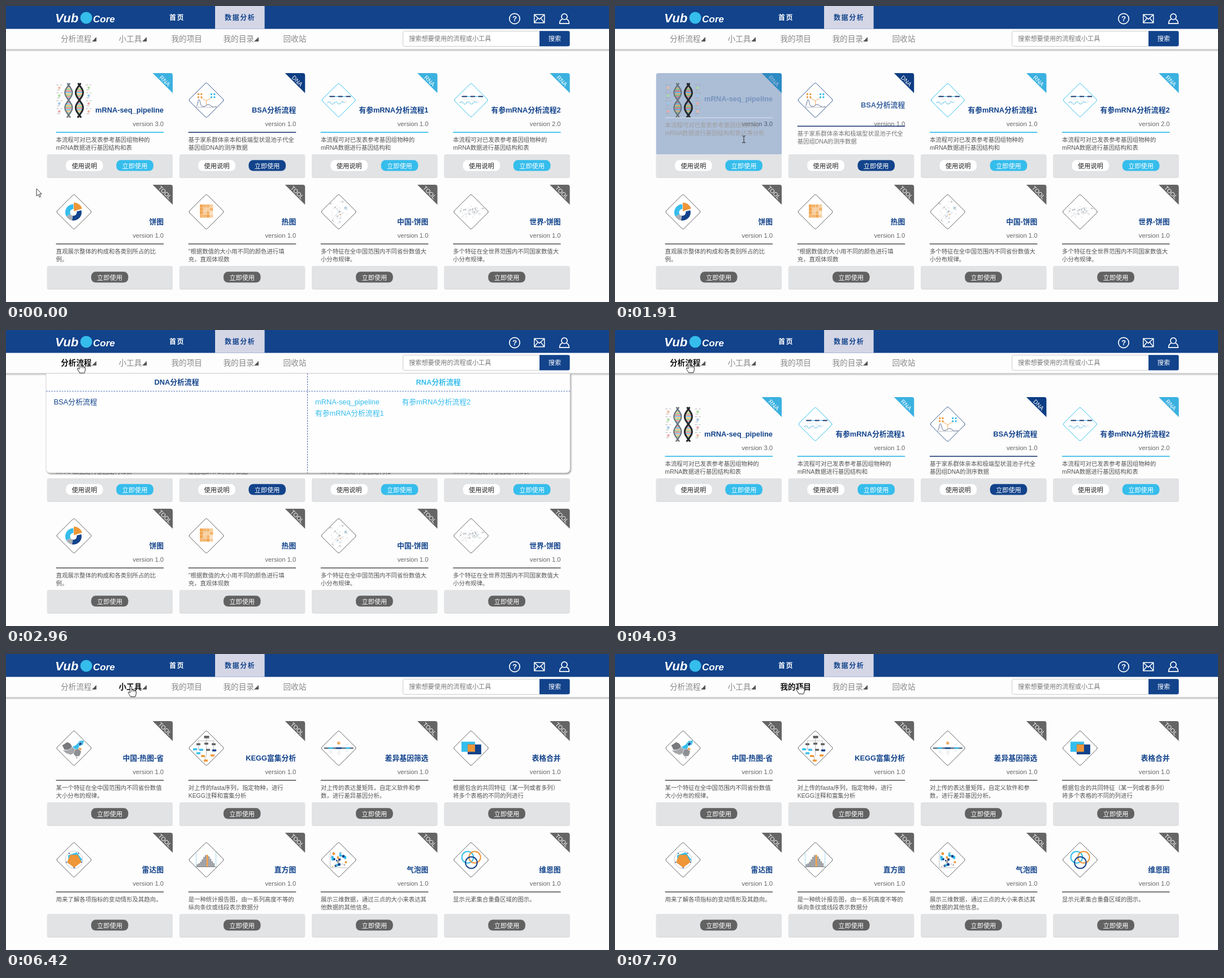
An HTML page for the animation above (8 s loop, 1067 by 525 pixels).

```html
<!DOCTYPE html>
<html lang="zh-CN">
<head>
<meta charset="utf-8">
<title>数据分析</title>
<style>
html, body { margin: 0; width: 100%; height: 100%; overflow: hidden; background: #fdfdfd; }
svg { display: block; width: 100%; height: 100%; }
text { font-family: "Liberation Sans", "Noto Sans CJK SC", "Noto Sans CJK", "Noto Sans CJK JP", sans-serif; white-space: pre; }
</style>
</head>
<body>
<svg id="stage" viewBox="0 0 1067 525">
  <defs>
    <filter id="drop" x="-5%" y="-10%" width="110%" height="125%">
      <feDropShadow dx="1.5" dy="2" stdDeviation="1.3" flood-color="#000" flood-opacity=".4"/>
    </filter>
    <filter id="soft" x="-5%" y="-10%" width="110%" height="130%">
      <feDropShadow dx="0" dy="1" stdDeviation=".7" flood-color="#000" flood-opacity=".25"/>
    </filter>
    <linearGradient id="edge" x2="0" y2="1">
      <stop offset="0" stop-color="#bdbdbd"/><stop offset=".55" stop-color="#d2d2d2"/><stop offset="1" stop-color="#fdfdfd"/>
    </linearGradient>
  </defs>
  <g id="page"></g>
  <g id="head"></g>
  <g id="menu"></g>
  <g id="cursor"></g>
</svg>
<script>
const LOOP = 8000;
const NAVY = '#12438b', CYAN = '#35bdec', GREY = '#626262', ORANGE = '#ee9638', SILVER = '#a9adb3';
const layer = id => document.getElementById(id);

// ---- small drawing helpers ----
const text = (x, y, s, size, fill, extra = '') =>
  `<text x="${x}" y="${y + size * 0.37}" font-size="${size}" fill="${fill}" ${extra}>${s}</text>`;
const BOLD = ' font-weight="700"', END = ' text-anchor="end"', MID = ' text-anchor="middle"', SLANT = ' font-style="italic"';
const rect = (x, y, w, h, fill, extra = '') =>
  `<rect x="${x}" y="${y}" width="${w}" height="${h}" fill="${fill}" ${extra}/>`;
const dot = (x, y, r, fill, extra = '') => `<circle cx="${x}" cy="${y}" r="${r}" fill="${fill}" ${extra}/>`;
const path = (d, stroke, w = 1, fill = 'none', extra = '') =>
  `<path d="${d}" stroke="${stroke}" stroke-width="${w}" fill="${fill}" ${extra}/>`;
const range = (n, f) => Array.from({ length: n }, (_, i) => f(i)).join('');
const random = seed => () => (seed = (seed * 16807) % 2147483647) / 2147483647;
const mix = (a, b, p) => `rgb(${a.map((v, i) => Math.round(v + (b[i] - v) * p))})`;
const polar = (r, deg) => [r * Math.cos(deg * Math.PI / 180), r * Math.sin(deg * Math.PI / 180)];
const WHITE = [255, 255, 255], DEEP = [18, 67, 139], INK = [85, 85, 85];

const diamond = (stroke, r = 31.5) =>
  path(`M-2 ${2 - r}Q0 ${-r} 2 ${2 - r}L${r - 2} -2Q${r} 0 ${r - 2} 2L2 ${r - 2}Q0 ${r} -2 ${r - 2}L${2 - r} 2Q${-r} 0 ${2 - r} -2Z`, stroke, 1, '#fff');

function sector(cx, cy, r, a, b, fill) {
  const [x1, y1] = polar(r, a), [x2, y2] = polar(r, b);
  return path(`M${cx} ${cy}l${x1} ${y1}A${r} ${r} 0 ${b - a > 180 ? 1 : 0} 1 ${cx + x2} ${cy + y2}Z`, 'none', 0, fill);
}

function strand(cx, amp, phase, stroke, w) {
  let d = '';
  for (let y = -30; y <= 31; y++) d += `${d ? 'L' : 'M'}${(cx + amp * Math.sin(y / 8.5 + phase)).toFixed(1)} ${y}`;
  return path(d, stroke, w);
}

function scatterMap(seed, w, h, n) {
  const rnd = random(seed);
  return range(n, i => {
    const x = (rnd() + rnd() - 1) * w / 2, y = (rnd() + rnd() - 1) * h / 2;
    const coast = path(`M${x} ${y}l${rnd() * 5 - 2.5} ${rnd() * 4 - 2}l${rnd() * 5 - 2.5} ${rnd() * 4 - 2}`, '#bcc3c8', .6);
    return coast + (i % 6 ? '' : dot(x, y, 1, 'none', 'stroke="#8b97a0" stroke-width=".6"'));
  });
}

// ---- card pictures, centred on 0,0 ----
const icons = {
  helix() {
    const rungs = ['#6aaf5b', '#d9534f', '#3f9fd0', '#e8a33c'];
    const helix = (cx, c, w) => range(24, i => {
      const y = -29 + i * 2.55, a = 6.5 * Math.sin(y / 8.5);
      return path(`M${cx - a} ${y}H${cx + a}`, rungs[i % 4], 1.4);
    }) + strand(cx, 6.5, 0, c, w) + strand(cx, 6.5, Math.PI, c, w);
    const notes = [-26, 26].map((x, k) => range(4, i =>
      dot(x, -22 + i * 14, 2.2, ['#f2b8a0', '#a8dc9a', '#9cc4ee', '#f0a5a5'][(i + k) % 4]) +
      path(`M${x - 5} ${-27 + i * 14}h4m3 0h3m-9 9h5`, '#9a9a9a', .8))).join('');
    return notes + helix(-9.5, '#66737f', 2.2) + helix(9.5, '#22272d', 3);
  },
  bsa: () => diamond('#34548f') +
    [[-14, ORANGE], [9, CYAN]].map(([x, c]) => range(4, i => dot(x + i % 2 * 5.3, -10.5 + (i >> 1) * 5.3, 1.7, c))).join('') +
    path('M-9-4L0 1L9-4M0 1V9', ORANGE, .8) +
    path('M-18 11C-15 11-15-1-13-1S-11 10-7 11Q-3 12 0 9T8 10T18 11', '#4a5d88', .9) + path('M-18 12.5H20', SILVER, .8),
  rna: () => diamond(CYAN, 30.5) + path('M-17-6.5H22', CYAN, 1.2) +
    path('M-16-6.5h9M-1-6.5h8M13-6.5h8', '#1d3567', 2) +
    path('M-20 5q3-4 6 0t6 0t6 0t6 0t6 0', '#9ad6ee', 2, 'none', 'stroke-dasharray="3.5 .8"') +
    path('M-12-2h8M0-1l14 6M6-3l9 6', '#c3d2dc', .9, 'none', 'stroke-dasharray="2 1"'),
  pie: () => diamond(GREY) + sector(-1, 1, 14.5, -15, 100, NAVY) + sector(-1, 1, 14.5, 100, 150, SILVER) +
    sector(-1, 1, 14.5, 150, 270, CYAN) + dot(-1, 1, 6, '#fff') + sector(-.3, -1, 15.5, -90, -18, ORANGE),
  heat() {
    const tones = ['#ee9638', '#f1a654', '#f3b670', '#f6cf9f', '#fae3c6'], rnd = random(77);
    return diamond(GREY) + range(16, i =>
      rect(-11.5 + i % 4 * 5.9, -13 + (i >> 2) * 5.9, 5.7, 5.7, tones[Math.min(4, (i % 4 + 4 - (i >> 2)) * .35 + rnd() * 2.5 | 0)]));
  },
  china: () => diamond(GREY) + scatterMap(41, 36, 38, 44) + dot(12, -7, 1.4, 'none', 'stroke="#4c8fb8" stroke-width=".8"') + dot(3, 5, 1.1, ORANGE),
  world: () => diamond(GREY) + scatterMap(93, 48, 24, 56),
  region: () => diamond(GREY) +
    path('M-21-5L-12-11L-6-8L-3-2L-9 3L-17 3Z', '#fff', .5, '#77797c') +
    path('M-20 4L-9 3L-3-2L2 2L0 9L-6 12L-14 9Z', '#fff', .5, '#a3a5a8') +
    path('M-3-2L4-6L10-13L18-14L16-6L9-3L8 2L2 2Z', '#fff', .5, CYAN) +
    path('M2 2L8 1L13 6L10 14L3 15L-1 10Z', '#fff', .5, '#8d9094') +
    path('M8-8L13-11L14-7L10-4Z', '#fff', .5, NAVY) + path('M8-1l5 1 0 4-4-1Z', '#fff', .5, ORANGE) + dot(5, 17, 1.3, SILVER),
  kegg() {
    const box = (x, y, c) => rect(x - 3.5, y - 1.7, 7, 3.4, c, 'rx=".6"');
    return diamond(GREY) + path('M0-18V-13M-14-7V-13H13V-7M0-13V14M-14-7V2M13-7V6M-20 2H-8M8 4H18M-2 14V20', SILVER, .8) +
      rect(-4, -22, 9, 4.5, GREY) + box(-14, -7, GREY) + box(0, -8, GREY) + box(13, -7, GREY) + box(-20, 2, CYAN) + box(-9, 3, CYAN) +
      box(3, 3, GREY) + box(14, 4, NAVY) + box(-14, 9, CYAN) + box(-6, 14, ORANGE) + box(11, 13, ORANGE) + box(-1, 22, ORANGE);
  },
  diff: () => diamond(GREY) + path('M-26 0H26', '#5d6e80', 2.6) + path('M-18 0h8M12 0h8', CYAN, 2.6) + path('M-5 0h10', NAVY, 2.6) +
    range(4, i => `<g transform="translate(0 -9) rotate(${i * 45})">${path('M-3.2 0H3.2', ORANGE, 1)}</g>`) +
    path('M-17 5h6M-16 8h5M-2 5h6M-3 8h6M-2 11h5M12 5h5M12-5l5-3', '#d3d9de', 1),
  merge: () => diamond(GREY) + rect(-17, -11.5, 24, 18, CYAN) + rect(-6, -6.5, 24, 17.5, NAVY) + rect(-6, -6.5, 13, 13, ORANGE),
  radar() {
    const poly = (rs, rot) => 'M' + rs.map((r, i) => polar(r, rot + i * 72).join(' ')).join('L') + 'Z';
    return diamond(GREY) + dot(0, 0, 15.5, 'none', `stroke="${SILVER}" stroke-width=".7"`) +
      path(poly([14, 15, 7, 12, 13], -70), 'none', 0, CYAN) + path(poly([11, 14, 14, 13, 11], -55), 'none', 0, ORANGE) +
      range(5, i => dot(...polar(14, -55 + i * 72), 1, NAVY));
  },
  hist: () => diamond(GREY) + range(11, i => {
    const h = 3 + 18 * Math.exp(-((i - 5.6) ** 2) / 11);
    return rect(-17 + i * 2.9, 12 - h, 2.6, h, i == 6 ? ORANGE : '#94989c');
  }) + path('M-18-14V12M17-14V12', '#8fcfe9', .8) + path('M-18 12.5H18', GREY, .8),
  bubble() {
    const rnd = random(519), hues = [NAVY, CYAN, ORANGE, SILVER];
    return diamond(GREY) + path('M-15-15V14H15', SILVER, .8) +
      range(26, i => dot(-12 + rnd() * 25, -13 + rnd() * 25, .7 + rnd() * 1.9, hues[i % 4]));
  },
  venn: () => diamond(GREY) + [[-6, -4.5, CYAN], [6.5, -4.5, ORANGE], [.5, 5, NAVY]]
    .map(([x, y, c]) => dot(x, y, 10.3, 'none', `stroke="${c}" stroke-width="2"`)).join('')
};

// ---- content ----
const kinds = {
  RNA: { ribbon: '#3bb1e0', line: CYAN, btn: CYAN },
  DNA: { ribbon: '#0d3d83', line: '#2c467f', btn: NAVY },
  TOOL: { ribbon: '#656565', line: GREY, btn: GREY }
};
const card = (kind, title, icon, lines, ver = '1.0', more = lines) => ({ kind, title, icon, lines, ver, more });
const rnaLine = '本流程可对已发表参考基因组物种的', rnaMore = [rnaLine, 'mRNA数据进行基因结构和表达等分析'];
const seq = card('RNA', 'mRNA-seq_pipeline', 'helix', [rnaLine, 'mRNA数据进行基因结构和表'], '3.0', rnaMore);
const bsa = card('DNA', 'BSA分析流程', 'bsa', ['基于家系群体亲本和极端型状混池子代全', '基因组DNA的测序数据'], '1.0',
  ['基于家系群体亲本和极端型状混池子代全', '基因组DNA的测序数据进行多态性位点', '的检测，并对性状、目标区域定位及注释', '等分析']);
const ref1 = card('RNA', '有参mRNA分析流程1', 'rna', [rnaLine, 'mRNA数据进行基因结构和'], '1.0', rnaMore);
const ref2 = card('RNA', '有参mRNA分析流程2', 'rna', [rnaLine, 'mRNA数据进行基因结构和表'], '2.0', rnaMore);
const tool = (title, icon, ...lines) => card('TOOL', title, icon, lines);

const pages = {
  all: [seq, bsa, ref1, ref2,
    tool('饼图', 'pie', '直观展示整体的构成和各类别所占的比', '例。'),
    tool('热图', 'heat', '"根据数值的大小用不同的颜色进行填', '充，直观体现数'),
    tool('中国-饼图', 'china', '多个特征在全中国范围内不同省份数值大', '小分布规律。'),
    tool('世界-饼图', 'world', '多个特征在全世界范围内不同国家数值大', '小分布规律。')],
  flows: [seq, ref1, bsa, ref2],
  tools: [
    tool('中国-热图-省', 'region', '某一个特征在全中国范围内不同省份数值', '大小分布的规律。'),
    tool('KEGG富集分析', 'kegg', '对上传的fasta序列，指定物种，进行', 'KEGG注释和富集分析'),
    tool('差异基因筛选', 'diff', '对上传的表达量矩阵，自定义软件和参', '数，进行差异基因分析。'),
    tool('表格合并', 'merge', '根据包含的共同特征（某一列或者多列）', '将多个表格的不同的列进行'),
    tool('雷达图', 'radar', '用来了解各项指标的变动情形及其趋向。'),
    tool('直方图', 'hist', '是一种统计报告图，由一系列高度不等的', '纵向条纹或线段表示数据分'),
    tool('气泡图', 'bubble', '展示三维数据，通过三点的大小来表达其', '他数据的其他信息。'),
    tool('维恩图', 'venn', '显示元素集合重叠区域的图示。')],
  empty: []
};

const menus = {
  flows: { h: 176.3, heads: [['DNA分析流程', NAVY], ['RNA分析流程', CYAN]],
    cols: [['BSA分析流程'], [], [], ['mRNA-seq_pipeline', '有参mRNA分析流程1'], ['有参mRNA分析流程2'], []], tint: [NAVY, CYAN] },
  tools: { h: 212, heads: [['基本绘图', '#808080'], ['计算统计', '#808080']],
    cols: [['折线图', '箱线图', '维恩图', '气泡图', '中国-热图-省', '世界-热图-国'],
      ['柱状图', '散点图', '饼图', '热图', '中国-热图-点图', '世界-热图-点图'],
      ['直方图', '雷达图', '中国-饼图', '世界-饼图'], ['差异基因筛选'], ['表格合并'], ['KEGG富集分析']], tint: ['#808080', '#808080'] }
};
const menuX = [84.5, 237.5, 385.5, 547, 700.5, 848];

// ---- views ----
const pill = (x, label, fill, ink) =>
  rect(x, 154.3, 65.6, 19.2, fill, 'rx="8"') + text(x + 32.8, 165, label, 11.2, ink, MID);

// p > 0: pointer is over the card; p < 0: the card is settling back
function drawCard(c, i, p = 0) {
  const k = kinds[c.kind], a = Math.abs(p), over = p > 0, up = -60 * a;
  const body = rect(0, 144, 222.3, 40.5, '#e2e3e5', 'rx="3" filter="url(#soft)"');
  const ribbon = path('M186.8 0H218.3Q222.3 0 222.3 4V35.5Z', 'none', 0, k.ribbon) +
    `<g transform="translate(208.6 13.6) rotate(45)">${text(0, 0, c.kind, 10.4, '#fff', MID)}</g>`;
  const cover = over ? path('M0 144V4Q0 0 4 0H218.3Q222.3 0 222.3 4V144Z', 'none', 0, NAVY, `fill-opacity="${.8 * a}"`) : '';
  const plate = over && c.icon != 'helix' ? rect(15.8, 16, 64, 64, '#fff') : '';
  const buttons = c.kind == 'TOOL' ? pill(78, '立即使用', k.btn, '#fff')
    : pill(33.3, '使用说明', '#fff', '#222') + pill(122.5, '立即使用', k.btn, '#fff');
  const ink = mix(INK, WHITE, a);
  return `<g transform="translate(${72.7 + 234.2 * (i % 4)} ${119 + 198 * (i >> 2)})">` + body + ribbon +
    text(206.3, 90.3, 'version ' + c.ver, 11.2, '#666', END) + cover + plate +
    `<g transform="translate(47.6 48)">${icons[c.icon]()}</g>` +
    text(206.3, 64.8 - 46 * a, c.title, 12.8, mix(DEEP, WHITE, a), BOLD + END) +
    rect(15.8, 104.2 + up, 190.5, 1.7, over ? mix(DEEP, WHITE, Math.min(1, a * 1.8)) : k.line) +
    (over ? c.more : c.lines).map((s, n) => text(15.8, 117.7 + up + n * 14.5, s, 10.4, ink)).join('') + buttons + '</g>';
}

const nav = [['分析流程', 97, 152], ['小工具', 199.5, 241], ['我的项目', 292.5], ['我的目录', 384.5, 439], ['回收站', 490.5]];

function drawHead(active) {
  return rect(0, 76, 1067, 5, 'url(#edge)') + rect(0, 40, 1067, 36.5, '#fdfdfd') + rect(0, 0, 1067, 40.6, NAVY) +
    text(87, 20.5, 'Vub', 22, '#fff', BOLD + SLANT) + dot(142, 21, 10.5, CYAN) +
    text(154, 22.3, 'Core', 17, '#fff', BOLD + SLANT) +
    rect(370, 0, 87.6, 40.6, '#d4d6e6') +
    text(289, 20.5, '首页', 12, '#fff', BOLD + ' letter-spacing="1.6"') +
    text(387, 20.5, '数据分析', 12, NAVY, BOLD + ' letter-spacing="1.6"') +
    dot(900, 22.5, 9.2, 'none', 'stroke="#fff" stroke-width="1.7"') + text(900, 22.5, '?', 13.5, '#fff', MID + BOLD) +
    path('M934.8 15.3H952.7V29.8H934.8ZM935 15.5L943.7 23.5L952.5 15.5M935 29.6L941.3 21.5M952.5 29.6L946.2 21.5', '#fff', 1.5) +
    path('M988 13.8a5 5 0 0 1 0 10.2a5 5 0 0 1 0-10.2M984.5 23Q979.6 25 979.6 31.2H996.4Q996.4 25 991.5 23', '#fff', 1.7) +
    nav.map(([s, x, tri], i) => text(x, 58, s, 13.6, i === active ? '#111' : '#888', i === active ? BOLD : '') +
      (tri ? path(`M${tri} 63H${tri + 8}V55Z`, 'none', 0, '#555') : '')).join('') +
    rect(702.5, 44.5, 242, 27, '#fff', 'rx="3" stroke="#ccc" stroke-width="1"') +
    text(713, 58.2, '搜索想要使用的流程或小工具', 11.2, '#777') +
    path('M944 44.3H994.6Q997.6 44.3 997.6 47.3V68.6Q997.6 71.6 994.6 71.6H944Z', 'none', 0, NAVY) +
    text(971, 58.2, '搜索', 11.2, '#fff', MID);
}

function drawMenu(m) {
  if (!m) return '';
  const bottom = 77 + m.h, dash = 'stroke-dasharray="2.6 2"';
  return path(`M70.8 77H998V${bottom - 8}Q998 ${bottom} 990 ${bottom}H78.8Q70.8 ${bottom} 70.8 ${bottom - 8}Z`, '#d0d0d0', .8, '#fefefe', 'filter="url(#drop)"') +
    path('M71 108.5H998', '#5272b0', 1.2, 'none', dash) + path(`M533.5 77V${bottom}`, '#5272b0', 1.2, 'none', dash) +
    m.heads.map(([s, c], i) => text(302 + i * 463, 92.6, s, 12.8, c, BOLD + MID)).join('') +
    m.cols.map((col, i) => col.map((s, n) => text(menuX[i], 127.3 + n * 20.35, s, 12.8, m.tint[i > 2 ? 1 : 0])).join('')).join('');
}

const cursors = {
  arrow: path('M0 0V13L3.2 10.2L5.3 15L7.4 14L5.3 9.4H9.2Z', '#222', .9, '#fff'),
  beam: path('M-3-6Q0-6 0-4.5Q0-6 3-6M0-5V5M-3 6Q0 6 0 4.5Q0 6 3 6', '#333', 1.1),
  hand: path('M-1.4 1.2Q0-1 1.5 1.2V6.5Q3.5 5.6 4.3 7.2Q6.2 6.3 7 8Q9.2 7.4 9.3 9.6V13Q9 16 7.6 18.8H-.5Q-2.2 15.5-4.6 12.4Q-5.2 10-3 10.3L-1.4 12Z', '#222', 1, '#fff') +
    path('M1.5 6.5V10M4.3 7.3V10.2M7 8.2V10.5', '#222', .8)
};

// ---- timeline: start, cursor, x, y, page, active nav item, menu, hovered cards ----
const steps = [
  [0, 'arrow', 54, 324, 'all'],
  [430, 'arrow', 130, 318, 'all'],
  [640, 'arrow', 232, 310, 'all'],
  [850, 'arrow', 400, 305, 'all'],
  [1060, 'arrow', 420, 255, 'all', -1, '', { 1: .06 }],
  [1280, 'beam', 362, 215, 'all', -1, '', { 1: .5 }],
  [1490, 'beam', 350, 221, 'all', -1, '', { 1: .9 }],
  [1700, 'beam', 322, 228, 'all', -1, '', { 1: 1 }],
  [1910, 'beam', 228, 236.5, 'all', -1, '', { 0: .43, 1: -.18 }],
  [2110, 'beam', 600, 215, 'all', -1, '', { 0: -.18, 2: .43 }],
  [2320, 'beam', 848, 200, 'all', -1, '', { 2: -.18, 3: .43 }],
  [2540, 'hand', 238, 56, 'all', 1, 'tools'],
  [2750, 'hand', 215, 57, 'all', 1, 'tools'],
  [2960, 'hand', 131, 57.5, 'all', 0, 'flows'],
  [3170, 'hand', 129, 57, 'all', 0, 'flows'],
  [3610, 'hand', 129, 57, 'empty', 0],
  [3820, 'hand', 129, 57, 'flows', 0],
  [4030, 'hand', 131, 57, 'flows', 0],
  [4680, 'hand', 140, 57, 'flows', 0, 'flows'],
  [4900, 'hand', 152, 57, 'flows', 0, 'flows'],
  [5110, 'hand', 214, 57, 'flows', 1, 'tools'],
  [5330, 'hand', 221, 57, 'flows', 1, 'tools'],
  [6210, 'hand', 221, 57, 'empty', 1],
  [6420, 'hand', 221, 57, 'tools', 1],
  [7290, 'hand', 226, 57, 'tools', 1, 'tools'],
  [7500, 'hand', 242, 55, 'tools', 1, 'tools'],
  [7700, 'hand', 326, 52, 'tools', 2]
];

let shown = -1;
function show(n) {
  const [, kind, x, y, page, active = -1, menu = '', hover = {}] = steps[n];
  layer('page').innerHTML = pages[page].map((c, i) => drawCard(c, i, hover[i])).join('');
  layer('head').innerHTML = drawHead(active);
  layer('menu').innerHTML = drawMenu(menus[menu]);
  layer('cursor').innerHTML = `<g transform="translate(${x} ${y})">${cursors[kind]}</g>`;
  shown = n;
}

const start = performance.now();
function tick() {
  const t = Math.max(0, performance.now() - start) % LOOP;
  let n = steps.length - 1;
  while (steps[n][0] > t) n--;
  if (n !== shown) show(n);
  requestAnimationFrame(tick);
}
tick();
</script>
</body>
</html>
```
